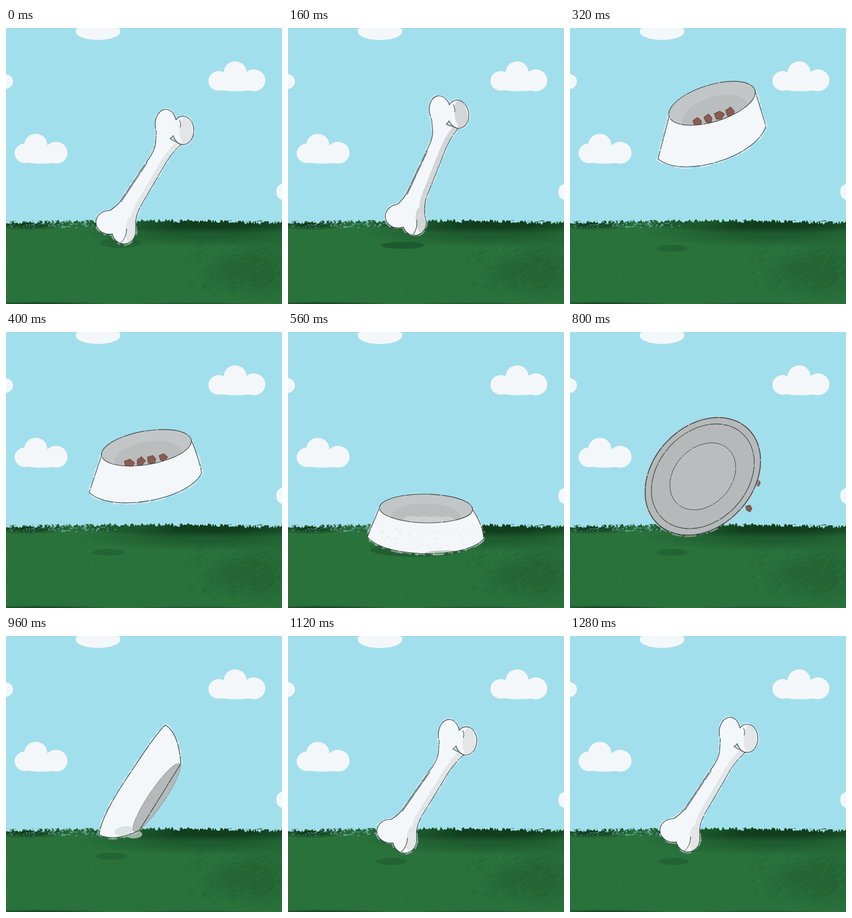
Recreate the animation shown at these times as an HTML page with a canvas. Size 480 by 480 pixels, loop 1360 ms.

```html
<!DOCTYPE html>
<html lang="en">
<head>
<meta charset="utf-8">
<title>Bone and bowl</title>
<style>
html, body { margin: 0; width: 100%; height: 100%; overflow: hidden; background: #a2dfec; }
canvas { display: block; width: 480px; height: 480px; }
</style>
</head>
<body>
<canvas id="stage" width="480" height="480"></canvas>
<script>
const STEP = 80, SIZE = 480, RAD = Math.PI / 180;
const WHITE = '#f4f7f9', INK = '#30363a', GREY = '#b5b9ba', SKY = '#a2dfec';
const stage = document.getElementById('stage').getContext('2d');
let ctx = stage, random;

function seeded(seed) {
  return () => {
    seed = (seed + 0x6D2B79F5) | 0;
    let n = Math.imul(seed ^ seed >>> 15, 1 | seed);
    n = n + Math.imul(n ^ n >>> 7, 61 | n) ^ n;
    return ((n ^ n >>> 14) >>> 0) / 4294967296;
  };
}
const between = (a, b) => a + (b - a) * random();
const mix = (a, b, k) => a + (b - a) * k;

function oval(x, y, rx, ry, turn = 0) {
  const path = new Path2D();
  path.ellipse(x, y, rx, ry, turn * RAD, 0, 2 * Math.PI);
  return path;
}

function fill(path, color, alpha = 1) {
  ctx.globalAlpha = alpha;
  ctx.fillStyle = color;
  ctx.fill(path);
  ctx.globalAlpha = 1;
}

function stroke(path, color, width, alpha = 1, dash = []) {
  ctx.globalAlpha = alpha;
  ctx.strokeStyle = color;
  ctx.lineWidth = width;
  ctx.setLineDash(dash);
  ctx.stroke(path);
  ctx.globalAlpha = 1;
}

// Pencil line with small gaps.
const ink = (path, width = 1.1, color = INK) => stroke(path, color, width, .9, [38, 1, 21, 2, 53, 1]);

// Broken dry-brush overspill around a painted shape.
function halo(path, color = WHITE) {
  for (const width of [4, 7]) {
    const dash = Array.from({ length: 8 }, () => between(2, 22));
    stroke(path, color, width, .4, dash);
  }
}

function clipped(path, draw) {
  ctx.save();
  ctx.clip(path);
  draw();
  ctx.restore();
}

/* ---------- scenery ---------- */

function cloud(x, y, width, peak) {
  const puffs = [
    oval(x + 18, y + 34, 18, 17),
    oval(x + width * peak, y + 20, 20, 20),
    oval(x + width - 20, y + 33, 20, 19),
    oval(x + width / 2, y + 38, width / 2 - 1, 14)
  ];
  puffs.forEach(puff => fill(puff, WHITE));
}

function softBlob(x, y, rx, ry, color, alpha) {
  ctx.save();
  ctx.translate(x, y);
  ctx.scale(rx, ry);
  const glow = ctx.createRadialGradient(0, 0, .3, 0, 0, 1);
  glow.addColorStop(0, color);
  glow.addColorStop(1, color + '00');
  fill(oval(0, 0, 1, 1), glow, alpha);
  ctx.restore();
}

function dabs(count, color, x0, x1, y0, y1, alpha) {
  ctx.fillStyle = color;
  for (let i = 0; i < count; i++) {
    ctx.globalAlpha = between(.3, 1) * alpha;
    ctx.fillRect(between(x0, x1), between(y0, y1), between(1, 5), between(1, 2.5));
  }
  ctx.globalAlpha = 1;
}

function hatch(count, color, x0, y0, y1) {
  for (let i = 0; i < count; i++) {
    const x = between(x0, SIZE), y = between(y0, y1), l = between(5, 13);
    stroke(new Path2D(`M${x} ${y} l${l} ${-l * .6}`), color, between(1, 2.5), .22);
  }
}

function paintScenery() {
  random = seeded(11);
  ctx.fillStyle = SKY;
  ctx.fillRect(0, 0, SIZE, SIZE);
  cloud(352, 58, 99, .47);
  cloud(15, 184, 92, .4);
  fill(oval(160, 6, 39, 15), WHITE);
  fill(oval(-2, 93, 14, 13), WHITE);
  fill(oval(482, 285, 12, 14), WHITE);

  const meadow = new Path2D(`M0 ${SIZE}`);
  for (let x = 0; x <= SIZE; x += 2) {
    meadow.lineTo(x, 340 - 4 * Math.sin(x * Math.PI / SIZE) + between(-4, 3));
  }
  meadow.lineTo(SIZE, SIZE);
  clipped(meadow, () => {
    ctx.fillStyle = '#2a723c';
    ctx.fillRect(0, 330, SIZE, 150);
    softBlob(350, 356, 230, 26, '#1d5a2d', .9);
    softBlob(360, 341, 220, 17, '#103c1c', 1);
    softBlob(40, 340, 70, 12, '#103c1c', 1);
    softBlob(190, 340, 110, 10, '#1d5a2d', .9);
    softBlob(440, 420, 75, 62, '#1d5a2d', .55);
    softBlob(375, 425, 45, 40, '#1d5a2d', .3);
    softBlob(60, 481, 130, 6, '#103c1c', .8);
    softBlob(330, 481, 130, 5, '#103c1c', .5);
    dabs(700, '#1f6231', 0, SIZE, 350, SIZE, .18);
    dabs(500, '#36834a', 0, SIZE, 365, SIZE, .18);
    hatch(170, '#1d5a2d', 310, 372, 465);
    hatch(90, '#36834a', 310, 385, 465);
  });
  dabs(170, '#17502a', 0, SIZE, 334, 342, .8);
  dabs(110, SKY, 0, 190, 336, 346, .5);
}

const shadow = (x = 178, y = 383, rx = 27, ry = 6, alpha = .35) =>
  fill(oval(x, y, rx, ry), '#174c27', alpha);

/* ---------- bone ---------- */

const BONE_BACK = new Path2D('M303 203 Q284 220 270 247 L235 307 Q222 328 225 352');
const BONE = new Path2D(
  'M262 180 L303 203 Q284 220 270 247 L235 307 Q222 328 225 352 L163 327 Q188 317 200 301 L246 232 Q262 210 261 195Z');
[[278, 168, 18, 26], [308, 178, 18, 24], [180, 338, 23, 20], [205, 353, 20, 22]]
  .forEach(knob => BONE.addPath(oval(...knob)));

// lift: 0 leaning on the grass, 1 at the top of the hop
function bone(lift = 0, shade = '#e3e5e7') {
  ctx.save();
  ctx.translate(240 + .5 * lift, 260 - 19 * lift);
  ctx.rotate(-8.5 * lift * RAD);
  ctx.translate(-240, -260);
  halo(BONE);
  ink(BONE, 2.2);
  fill(BONE, WHITE);
  clipped(BONE, () => {
    fill(oval(313, 180, 11, 26), shade);
    fill(oval(217, 353, 9, 24), shade);
    stroke(BONE_BACK, shade, 17);
  });
  ink(new Path2D('M302 160 Q305 166 303 173 M200 303 L246 234 M210 349 Q209 366 199 374'), 1);
  ctx.restore();
}

/* ---------- bowl ---------- */

const AIR = { x: 247, y: 131, tilt: -17, rx: 78, ry: 32, skew: -20, h: 65 };
const REST = { x: 240, y: 307, tilt: 1, rx: 81, ry: 25, skew: 0, h: 51 };

function kibble(x, y, size = 6) {
  const bit = new Path2D();
  for (let a = 0; a < 5; a++) {
    const r = size * between(.8, 1.2);
    bit.lineTo(x + r * Math.cos(a * 1.26), y + r * Math.sin(a * 1.26));
  }
  bit.closePath();
  fill(bit, '#8a5c50');
  ink(bit, .9, '#4d3935');
}

// fall: 0 in the air and full, 1 on the grass and empty
function bowl(fall, changes = {}) {
  const shape = {};
  for (const key in AIR) shape[key] = mix(AIR[key], REST[key], fall);
  const { x, y, tilt, rx, ry, skew, h } = { ...shape, ...changes };
  const left = skew - rx - 20, right = skew + rx + 20;
  const rim = oval(0, 0, rx, ry);
  const side = new Path2D(`M${-rx} 0 L${left} ${h}
    C${left + 30} ${h * 1.72} ${right - 30} ${h * 1.72} ${right} ${h} Q${right} ${h * .6} ${rx} 0`);
  ctx.save();
  ctx.translate(x, y);
  ctx.rotate(tilt * RAD);
  halo(side);
  fill(side, WHITE);
  if (fall === 1) {
    clipped(side, () => {
      dabs(70, '#a9c0b0', left, right, h * .5, h * 1.4, .3);
      fill(oval(27, h * 1.5, 30, 4, -4), '#a9beb0', .8);
    });
  }
  ink(side);
  fill(rim, '#c3c6c7');
  clipped(rim, () => {
    fill(oval(0, ry * .55, rx * .75, ry * .9), '#b4b8b9', .6);
    for (let i = 0; i < 4; i++) {
      const spot = -34 + 20 * i;
      if (fall < 1) kibble(spot, ry * .75, 8);
      else fill(oval(spot + 10, ry * .8, 14, 7), '#d0d3d4', .8);
    }
  });
  ink(rim);
  ctx.restore();
}

// squeeze: 1 facing the viewer, smaller when turning towards its edge
function underside(squeeze = 1) {
  const turn = mix(-60, -47, squeeze);
  const disc = scale => oval(231, 251, 114 * scale, 87 * scale * squeeze, turn);
  if (squeeze < 1) {
    const back = oval(210, 238, 114, 87 * squeeze, turn);
    halo(back);
    fill(back, WHITE);
    ink(back);
  }
  halo(disc(1), '#c9cdce');
  fill(disc(1), GREY);
  fill(disc(.57), '#bdc1c2', .5);
  ink(disc(1), 1.5);
  ink(disc(.89));
  ink(disc(.57), .9);
}

const EDGE = new Path2D(
  'M277 155 Q300 168 304 222 L232 338 Q190 358 162 346 Q165 313 215 240 Q262 168 277 155Z');

function edge() {
  const base = oval(262, 281, 71, 14, -56);
  halo(EDGE);
  fill(oval(222, 345, 15, 7), '#b9cbc0', .8);
  fill(EDGE, WHITE);
  fill(oval(205, 339, 16, 8, -10), '#d5dfdb', .8);
  fill(base, GREY);
  ink(base, .8, '#777d80');
  ink(EDGE, 1.2);
}

/* ---------- action ---------- */

const poses = [
  () => { shadow(200, 374, 36, 9); bone(); },
  () => { shadow(200, 377, 37, 7, .5); bone(.4); },
  () => { shadow(200, 378, 38, 6, .6); bone(1, '#d3d5d7'); },
  () => { shadow(); bowl(0, { y: 118, tilt: -32, rx: 68 }); },
  () => { shadow(); bowl(0); },
  () => { shadow(); bowl(.4); },
  () => { shadow(241, 384, 125, 11, .5); bowl(1, { y: 326, rx: 120, ry: 22, h: 45 }); },
  () => { shadow(225, 379, 82, 12, .5); bowl(1); },
  () => { shadow(225, 380, 82, 12, .5); bowl(1, { y: 309, h: 50 }); },
  () => { shadow(); bowl(.5, { tilt: -26 }); kibble(320, 238); },
  () => { shadow(); kibble(326, 262); kibble(311, 307); kibble(280, 320, 4); underside(); },
  () => { shadow(); underside(.6); kibble(318, 336, 5); },
  () => { shadow(183); edge(); },
  () => { shadow(183); bone(.4, '#d3d5d7'); },
  () => { shadow(180, 392); bone(-.15); },
  () => { shadow(180, 392); bone(-.05); },
  () => { shadow(180, 392); bone(); }
];

const scenery = document.createElement('canvas');
scenery.width = scenery.height = SIZE;
ctx = scenery.getContext('2d');
paintScenery();
ctx = stage;

function play(now) {
  const index = Math.floor(now / STEP) % poses.length;
  random = seeded(100 + index);
  ctx.drawImage(scenery, 0, 0);
  poses[index]();
  requestAnimationFrame(play);
}
requestAnimationFrame(play);
</script>
</body>
</html>
```
